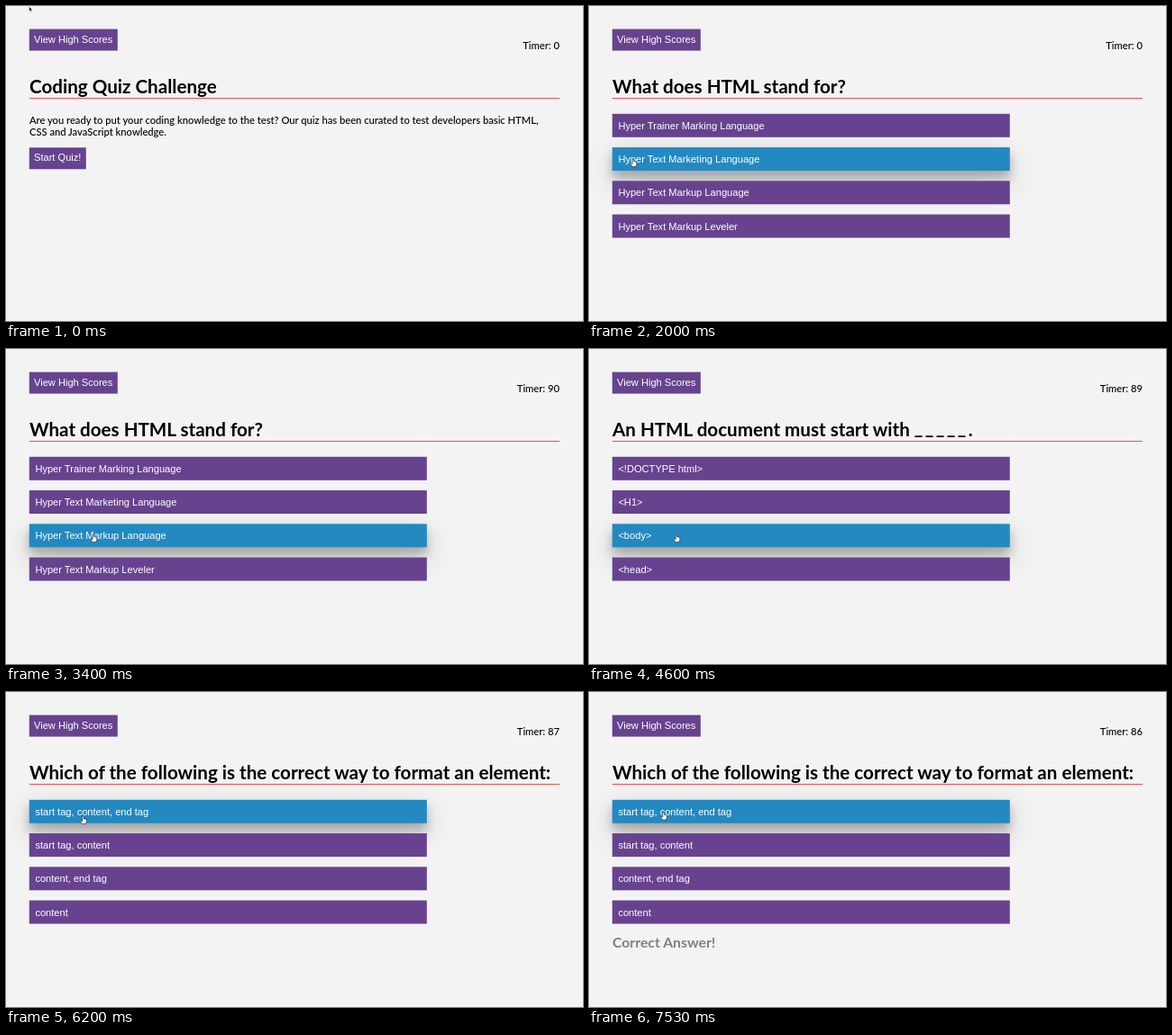
These frames come from a looping animation (640 by 350 pixels, 8000 ms). An HTML page:

```html
<!DOCTYPE html>
<html lang="en">
<head>
<meta charset="utf-8">
<title>Coding Quiz</title>
<style>
  html, body { margin: 0; width: 100%; height: 100%; overflow: hidden; background: #f3f3f3; }
  body { font: 500 11.2px/13.4px Lato, sans-serif; color: #000; }
  body > * { position: absolute; left: 26px; margin: 0; white-space: nowrap; }
  h1 { top: 77px; width: 588px; height: 25px; font: 700 20.6px/25px Lato, sans-serif; border-bottom: 1px solid #ee4c54; }
  h1 span { position: relative; top: -2px; letter-spacing: 2.4px; }
  p { top: 120px; }
  #timer { left: auto; right: 26px; top: 37px; }
  #result { top: 268px; font: 700 15.8px/20px Lato, sans-serif; color: #808080; }
  .btn { box-sizing: border-box; top: 0; left: 0; height: 23.6px; padding-left: 5.2px; background: #67438f; color: #fff;
         font: 11.1px/23.6px "Liberation Sans", Arial, sans-serif; }
  .option { width: 441.2px; height: 26.2px; line-height: 26.2px; padding-left: 6.6px; }
  .hover { background: #2389c0; box-shadow: 0 8px 11px rgba(0,0,0,.24), 0 12px 35px rgba(0,0,0,.19); }
  svg { left: 0; top: 0; overflow: visible; z-index: 1; }
</style>
</head>
<body>
<div class="btn" style="transform:translate(25.8px,25.6px);width:98px">View High Scores</div>
<div id="timer"></div>
<h1 id="title"></h1>
<p id="intro">Are you ready to put your coding knowledge to the test? Our quiz has been curated to test developers basic HTML,<br>CSS and JavaScript knowledge.</p>
<div id="start" class="btn" style="transform:translate(25.8px,157.3px);width:63px">Start Quiz!</div>
<div id="result">Correct Answer!</div>
<svg id="cursor" width="10" height="12">
  <path id="arrow" d="M0 0V5.4L1.3 4.3L2.2 6.3L3.2 5.9L2.3 3.9H4Z" fill="#111" stroke="#fff" stroke-width=".5"/>
  <path id="hand" d="M-.8 .6Q0-.4 .8 .6V3Q2.2 2.6 3.8 3.8V6L2.8 8.6H-1.2L-3 5.4Q-2.6 4.4-.8 5.6Z" fill="#fff" stroke="#222" stroke-width=".6"/>
</svg>
<script>
const $ = id => document.getElementById(id);
const LOOP = 8000;

const scenes = [
  { from: 0, title: "Coding Quiz Challenge", options: [] },
  { from: 2000, answered: 3600, title: "What does HTML stand for?", options: [
    "Hyper Trainer Marking Language", "Hyper Text Marketing Language",
    "Hyper Text Markup Language", "Hyper Text Markup Leveler"] },
  { from: 4600, answered: 5200, title: "An HTML document must start with <span>_____</span>.",
    options: ["<!DOCTYPE html>", "<H1>", "<body>", "<head>"] },
  { from: 6200, answered: 7530, title: "Which of the following is the correct way to format an element:",
    options: ["start tag, content, end tag", "start tag, content", "content, end tag", "content"] }
];

// Pointer moves, at rest in between
const moves = [
  { from: 460, to: 730, x: 94, y: 171 },
  { from: 1000, to: 1700, x: 49, y: 170 },
  { from: 2530, to: 2900, x: 84, y: 243 },
  { from: 3060, to: 3330, x: 97, y: 206 },
  { from: 4600, to: 5050, x: 85.5, y: 138 },
  { from: 6200, to: 6620, x: 90, y: 244 },
  { from: 6700, to: 7380, x: 82.5, y: 133.5 }
];

const rowTop = i => 119.8 + 37.25 * i;
const options = [0, 1, 2, 3].map(i => {
  const el = document.createElement("div");
  el.className = "btn option";
  el.style.transform = `translate(25.8px, ${rowTop(i)}px)`;
  document.body.insertBefore(el, $("result"));
  return el;
});

const show = (el, on) => el.style.display = on ? "" : "none";
const sceneAt = t => scenes.findLast(s => t >= s.from);

function pointer(t) {
  let x = 25.5, y = .5;
  for (const m of moves) {
    const p = Math.min(1, Math.max(0, (t - m.from) / (m.to - m.from)));
    const s = p * p * (3 - 2 * p);
    x += (m.x - x) * s;
    y += (m.y - y) * s;
  }
  return [x, y];
}

function hovered(t) {
  const [x, y] = pointer(t);
  if (sceneAt(t) === scenes[0])
    return x >= 26 && x < 89 && y >= 157 && y < 181 ? $("start") : null;
  return options.find((el, i) => y >= rowTop(i) && y < rowTop(i) + 26.2) || null;
}

let current;
function setScene(scene) {
  if (scene === current) return;
  current = scene;
  const intro = scene === scenes[0];
  $("title").innerHTML = scene.title;
  show($("intro"), intro);
  show($("start"), intro);
  options.forEach((el, i) => {
    show(el, !intro);
    el.textContent = scene.options[i] || "";
  });
}

function draw(t) {
  setScene(sceneAt(t));
  $("timer").textContent = "Timer: " + (t < 3030 ? 0 : 90 - Math.floor((t - 3030) / 1000));
  show($("result"), t >= current.answered);

  const target = hovered(t);
  for (const el of [$("start"), ...options]) el.classList.toggle("hover", el === target);

  // The pointer's shape follows the hover slightly late
  const hand = hovered(Math.max(0, t - 30));
  show($("hand"), hand);
  show($("arrow"), !hand);
  const [x, y] = pointer(t);
  $("cursor").style.transform = `translate(${x}px, ${y}px)`;
}

function tick() {
  draw(performance.now() % LOOP);
  requestAnimationFrame(tick);
}
tick();
</script>
</body>
</html>
```
